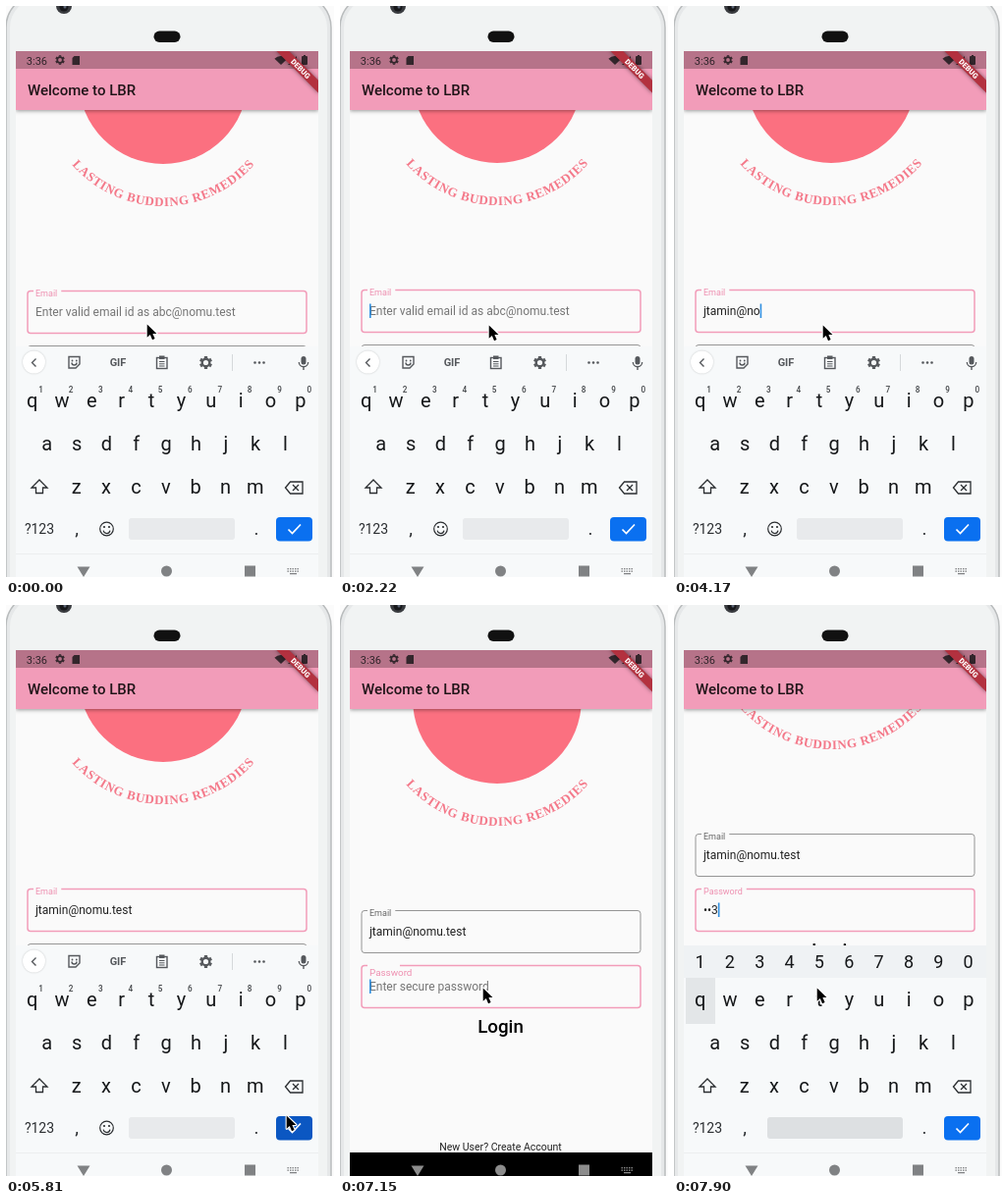
These frames come from a looping animation (334 px wide and 582 px high, 8000 ms). An HTML page with a canvas:

```html
<!DOCTYPE html>
<html lang="en">
<head>
<meta charset="utf-8">
<title>Sign-in form</title>
<style>
html, body { margin: 0; width: 100%; height: 100%; overflow: hidden; background: #fff; }
canvas { display: block; width: 334px; height: 582px; }
</style>
</head>
<body>
<canvas id="stage"></canvas>
<script>
const W = 334, H = 582, LOOP = 8000;
const canvas = document.getElementById('stage');
const c = canvas.getContext('2d');
const dpr = window.devicePixelRatio || 1;
canvas.width = W * dpr;
canvas.height = H * dpr;

const SANS = 'Roboto, sans-serif';
const PINK = '#f29cb9', DARK = '#212121', ICON = '#55585c';
const KEY_GAP = 30.35;
const USER = 'jtamin', MAIL = USER + '@nomu.test';

// Each step overrides part of the state from its time on.
const start = {
  scroll: 21, mouse: [143, 324], text: '', under: 0, caret: false, focus: 'email',
  strip: null, kb: 0, digits: false, press: false, pass: '', float: 0
};
const steps = [
  [150, { mouse: [151, 325] }],
  [440, { caret: true }],
  [740, { text: 'j', under: 1, scroll: 21.5 }],
  [890, { scroll: 22, strip: ['j', 'join', 'just'] }],
  [1340, { text: 'jp', under: 2 }],
  [1490, { strip: ['jp', 'jpg', 'jpeg'] }],
  [1630, { text: 'j', under: 1, strip: ['j', 'join', 'just'] }],
  [2080, { text: '', under: 0, strip: null }],
  [2230, { text: 'j', under: 1 }],
  [2380, { text: 'jt', under: 2, strip: ['j', 'join', 'just'] }],
  [2520, { text: 'jta', under: 3, strip: ['', 'jt', ''] }],
  [2670, { text: 'jtam', under: 4, strip: ['', 'jta', ''] }],
  [2820, { text: 'jtami', under: 5, strip: ['', 'jtam', ''] }],
  [2970, { text: USER, under: 5, strip: ['', 'jtami', ''] }],
  [3270, { under: 6, strip: ['', USER, ''] }],
  [3570, { text: MAIL.slice(0, 7), under: 0 }],
  [3720, { strip: null }],
  [3870, { text: MAIL.slice(0, 8) }],
  [4170, { text: MAIL.slice(0, 9) }],
  [4310, { text: MAIL.slice(0, 11) }],
  [4610, { text: MAIL.slice(0, 12) }],
  [4760, { text: MAIL.slice(0, 13) }],
  [4910, { text: MAIL.slice(0, 14) }],
  [5060, { text: MAIL }],
  [5360, { mouse: [172, 350] }],
  [5510, { mouse: [222, 425] }],
  [5660, { mouse: [272, 502], caret: false }],
  [5810, { mouse: [285, 520], press: true }],
  [5960, { press: false, focus: '', kb: 40, scroll: 16 }],
  [6110, { kb: 150, scroll: 4 }],
  [6260, { kb: 240, scroll: 0 }],
  [6410, { mouse: [274, 508] }],
  [6560, { mouse: [236, 474] }],
  [6710, { mouse: [188, 428] }],
  [6850, { mouse: [156, 398] }],
  [7000, { mouse: [145, 390] }],
  [7150, { focus: 'pass', float: 0.72, caret: true }],
  [7300, { float: 1, kb: 80, digits: true }],
  [7450, { kb: 0, scroll: 22 }],
  [7600, { scroll: 56, pass: '1' }],
  [7750, { scroll: 78, pass: '•2' }],
  [7900, { pass: '••3' }]
];

function stateAt(t) {
  const s = { ...start };
  for (const [at, change] of steps) if (t >= at) Object.assign(s, change);
  return s;
}

function rect(x, y, w, h, fill) {
  c.fillStyle = fill;
  c.fillRect(x, y, w, h);
}

function round(x, y, w, h, r, fill) {
  c.beginPath();
  c.roundRect(x, y, w, h, r);
  c.fillStyle = fill;
  c.fill();
}

function disc(x, y, r, fill) {
  c.beginPath();
  c.arc(x, y, r, 0, 7);
  c.fillStyle = fill;
  c.fill();
}

function poly(points, close) {
  c.beginPath();
  for (let i = 0; i < points.length; i += 2) c.lineTo(points[i], points[i + 1]);
  if (close) c.closePath();
}

function line(points, color, width = 1, close = false) {
  poly(points, close);
  c.strokeStyle = color;
  c.lineWidth = width;
  c.stroke();
}

function shape(points, fill) {
  poly(points, true);
  c.fillStyle = fill;
  c.fill();
}

// Text is placed by its baseline.
function write(str, x, y, size, color, align = 'left', weight = 400, family = SANS) {
  c.font = `${weight} ${size}px ${family}`;
  c.textAlign = align;
  c.fillStyle = color;
  c.fillText(str, x, y);
  return c.measureText(str).width;
}

function gear(x, y, r, color) {
  c.lineWidth = r * 0.36;
  c.strokeStyle = color;
  c.beginPath();
  c.arc(x, y, r * 0.58, 0, 7);
  c.stroke();
  for (let i = 0; i < 6; i++) {
    const a = i * Math.PI / 3 + Math.PI / 6;
    const dx = Math.cos(a) * r, dy = Math.sin(a) * r;
    line([x + dx * 0.7, y + dy * 0.7, x + dx, y + dy], color, r * 0.5);
  }
}

function drawPhone() {
  rect(0, 0, W, H, '#fbfbfb');
  c.beginPath();
  c.roundRect(0, -12, 331, 700, 34);
  c.fillStyle = '#e6e8e9';
  c.fill();
  c.strokeStyle = '#b9bcbd';
  c.lineWidth = 1.5;
  c.stroke();
  round(4, -8, 323, 700, 30, '#f1f3f3');
  disc(59, 0, 8, '#3a3c40');
  disc(59, 1, 4.5, '#17181b');
  disc(60, 1, 1.5, '#5b6474');
  round(150.5, 25.5, 27, 11.5, 5.7, '#111');
}

function drawBars() {
  c.save();
  c.shadowColor = 'rgba(0,0,0,.4)';
  c.shadowBlur = 4 * dpr;
  c.shadowOffsetY = dpr;
  rect(10, 64, 308, 42, PINK);
  c.restore();
  rect(10, 46, 308, 18, '#b67389');
  write('3:36', 20.8, 59.5, 11, '#30242a');
  gear(55, 55, 4.8, '#33262c');
  shape([69.5, 51, 75, 51, 75, 60, 67.5, 60, 67.5, 53], '#33262c');
  c.beginPath();
  c.moveTo(280, 60);
  c.arc(280, 60, 9, -Math.PI * 0.76, -Math.PI * 0.24);
  c.fillStyle = '#33262c';
  c.fill();
  shape([296, 51, 296, 60, 287, 60], '#33262c');
  round(301, 51, 6, 9, 1, '#33262c');
  rect(303, 50, 2, 1, '#33262c');
  write('Welcome to LBR', 22, 90.5, 15, 'rgba(0,0,0,.87)', 'left', 500);

  c.save();
  c.beginPath();
  c.rect(10, 46, 308, 60);
  c.clip();
  c.translate(318, 46);
  c.rotate(Math.PI / 4);
  c.shadowColor = 'rgba(0,0,0,.5)';
  c.shadowBlur = 4 * dpr;
  rect(-30, 21, 60, 9, '#b3313f');
  c.shadowColor = 'transparent';
  write('DEBUG', 0, 28.2, 7.65, '#fff', 'center', 900);
  c.restore();
}

function arcText(str, cx, cy, r) {
  c.font = '700 13px "Liberation Serif", serif';
  c.textAlign = 'center';
  c.fillStyle = '#f4798a';
  const gap = 0.35;
  const widths = [...str].map(ch => c.measureText(ch).width + gap);
  let run = -widths.reduce((a, b) => a + b) / 2;
  [...str].forEach((ch, i) => {
    const a = (run + widths[i] / 2) / r;
    run += widths[i];
    c.save();
    c.translate(cx, cy);
    c.rotate(-a);
    c.fillText(ch, 0, r + 4);
    c.restore();
  });
}

function drawCaret(x, y) {
  rect(x, y + 14, 1.6, 14.5, '#2f8fe0');
}

function field(y, label, o) {
  const { text = '', hint = '', focus, float = 1, caret, under = 0 } = o;
  const color = focus ? PINK : '#959595';
  const size = 12 - 3 * float;
  c.font = `400 9px ${SANS}`;
  const gap = (c.measureText(label).width + 6) * float;

  c.save();
  c.beginPath();
  c.rect(10, y - 5, 308, 60);
  c.rect(28, y - 3, gap, 6);
  c.clip('evenodd');
  c.beginPath();
  c.roundRect(22, y, 284, 43, 3);
  c.strokeStyle = color;
  c.lineWidth = focus ? 1.5 : 1;
  c.stroke();
  c.restore();

  write(label, 30, y + 25 - 20 * float, size, focus ? '#ee8fb0' : '#666');
  if (text) {
    const w = write(text, 30, y + 25, 12, DARK);
    if (under) rect(30, y + 27, c.measureText(text.slice(0, under)).width, 0.9, DARK);
    if (focus && caret) drawCaret(30 + w, y);
  } else if (focus) {
    write(hint, 30, y + 25, 12, '#757575');
    if (caret) drawCaret(30, y);
  }
}

function drawPage(s) {
  rect(10, 64, 308, 494, '#fafafa');
  c.save();
  c.translate(0, -s.scroll);
  disc(160, 96, 86, '#fb7080');
  arcText('LASTING BUDDING REMEDIES', 160, 102, 119);
  field(311.5, 'Email', {
    text: s.text, hint: 'Enter valid email id as abc@nomu.test',
    focus: s.focus === 'email', caret: s.caret, under: s.under
  });
  field(367.5, 'Password', {
    text: s.pass, hint: 'Enter secure password',
    focus: s.focus === 'pass', caret: s.caret, float: s.float
  });
  write('Login', 163.5, 436, 18.75, '#000', 'center', 500);
  write('New User? Create Account', 163.5, 556, 10.5, DARK, 'center');
  c.restore();
}

function drawMic() {
  round(300.5, 357, 5, 8.5, 2.5, ICON);
  c.beginPath();
  c.arc(303, 363, 4.7, 0, Math.PI);
  c.strokeStyle = ICON;
  c.lineWidth = 1.3;
  c.stroke();
  line([303, 367.5, 303, 371], ICON, 1.4);
}

function chevron(dir) {
  c.save();
  c.shadowColor = 'rgba(0,0,0,.22)';
  c.shadowBlur = 2 * dpr;
  disc(28.5, 363, 11.5, '#fff');
  c.restore();
  line([28.5 - 2 * dir, 359.5, 28.5 + 2 * dir, 363.5, 28.5 - 2 * dir, 367.5], ICON, 1.4);
}

function drawTools() {
  chevron(-1);
  line([64, 357.5, 75, 357.5, 75, 365, 71, 369, 64, 369], ICON, 1.4, true);
  disc(67.5, 361.5, 0.9, ICON);
  disc(71.8, 361.5, 0.9, ICON);
  c.beginPath();
  c.arc(69.5, 363.5, 2.5, 0, Math.PI);
  c.stroke();
  write('GIF', 114, 367, 11, ICON, 'center', 700);
  c.strokeStyle = ICON;
  c.lineWidth = 1.4;
  c.strokeRect(153.5, 358.5, 10.5, 11);
  rect(156, 356.5, 5.5, 3.5, ICON);
  for (const y of [362.5, 364.8, 367]) line([156, y, 161.5, y], ICON, 1);
  gear(203.5, 363.5, 6.5, ICON);
  rect(230, 355, 1, 17, '#d5d8da');
  for (const x of [253.5, 258, 262.5]) disc(x, 363.5, 1.3, ICON);
  drawMic();
}

function drawWords(words) {
  chevron(1);
  words.forEach((w, i) => write(w, 78 + 85 * i, 368, 13, '#44474a', 'center'));
  if (words[0]) for (const x of [118, 208]) rect(x, 354, 1, 19, '#cfd2d4');
  drawMic();
}

function keyRow(keys, x, y, size = 20) {
  [...keys].forEach((k, i) => write(k, x + KEY_GAP * i, y, size, '#16181a', 'center'));
}

function drawKeyboard(s) {
  c.save();
  c.beginPath();
  c.rect(10, 106, 308, 452);
  c.clip();
  c.translate(0, s.kb);
  rect(10, 347, 308, 211, '#f7f9fa');
  if (s.digits) {
    rect(10, 347, 308, 33, '#eff2f4');
    rect(12, 380, 30, 47, '#e3e6e8');
    keyRow('1234567890', 26.5, 370, 18);
  } else {
    if (s.strip) drawWords(s.strip); else drawTools();
    [...'1234567890'].forEach((d, i) =>
      write(d, 35.7 + KEY_GAP * i, 394, 8.2, '#44474a', 'center', 500));
  }
  keyRow('qwertyuiop', 26.7, 408.5);
  keyRow('asdfghjkl', 41.7, 452.5);
  keyRow('zxcvbnm', 71.7, 496.5);

  const ink = '#2a2d30';
  line([34, 483, 42, 491, 37.5, 491, 37.5, 496.5, 30.5, 496.5, 30.5, 491, 26, 491], ink, 1.3, true);
  line([284.5, 491, 289.5, 485, 302, 485, 302, 497, 289.5, 497], ink, 1.3, true);
  line([292, 488, 298, 494], ink, 1.3);
  line([298, 488, 292, 494], ink, 1.3);

  write('?123', 34, 538, 14, ink, 'center');
  write(',', 72, 539, 19, ink, 'center');
  write('.', 255, 539, 19, ink, 'center');
  if (s.digits) {
    round(95, 522, 138, 22, 3, '#dde0e2');
  } else {
    round(125, 522, 108, 22, 3, '#e8eaec');
    c.strokeStyle = ink;
    c.lineWidth = 1.2;
    c.beginPath();
    c.arc(102.5, 533, 6.8, 0, 7);
    c.stroke();
    c.beginPath();
    c.arc(102.5, 534, 3.5, 0.2, Math.PI - 0.2);
    c.stroke();
    disc(100, 531, 1.1, ink);
    disc(105, 531, 1.1, ink);
  }
  round(275, 521, 37, 24.5, 4, s.press ? '#0b57c2' : '#0a70f0');
  line([287.5, 533.5, 291.5, 537.5, 300, 528.5], '#fff', 1.7);
  c.restore();
}

function drawNav(dark) {
  rect(10, 558, 308, 24, dark ? '#000' : '#f7f9fa');
  if (!dark) rect(10, 558, 308, 1, '#eceeef');
  const ink = dark ? '#8c8c8c' : '#808284';
  shape([72.5, 571.5, 85.5, 571.5, 79, 582], ink);
  disc(163.5, 576, 5.5, ink);
  rect(243, 570.5, 11, 11, ink);
  for (let row = 0; row < 2; row++)
    for (let i = 0; i < 5; i++) rect(286.5 + i * 2.5, 573 + row * 2.5, 1.4, 1.4, ink);
  rect(289, 578, 7, 1.3, ink);
}

function drawMouse([x, y]) {
  c.save();
  c.translate(x + 0.7, y + 0.5);
  c.scale(0.92, 0.92);
  c.lineJoin = 'round';
  const arrow = [0, 0, 0, 14.5, 3.4, 11.4, 5.8, 17, 8.6, 15.8, 6.2, 10.4, 10.6, 10.2];
  line(arrow, '#fff', 2.4, true);
  shape(arrow, '#000');
  c.restore();
}

function frame(now) {
  const s = stateAt(now % LOOP);
  c.setTransform(dpr, 0, 0, dpr, 0, 0);
  drawPhone();
  c.save();
  c.beginPath();
  c.rect(10, 46, 308, 536);
  c.clip();
  drawPage(s);
  drawBars();
  const hidden = s.kb > 211;
  if (!hidden) drawKeyboard(s);
  drawNav(hidden);
  c.restore();
  drawMouse(s.mouse);
}

const origin = performance.now();
function tick() {
  frame(performance.now() - origin);
  requestAnimationFrame(tick);
}
tick();
</script>
</body>
</html>
```
